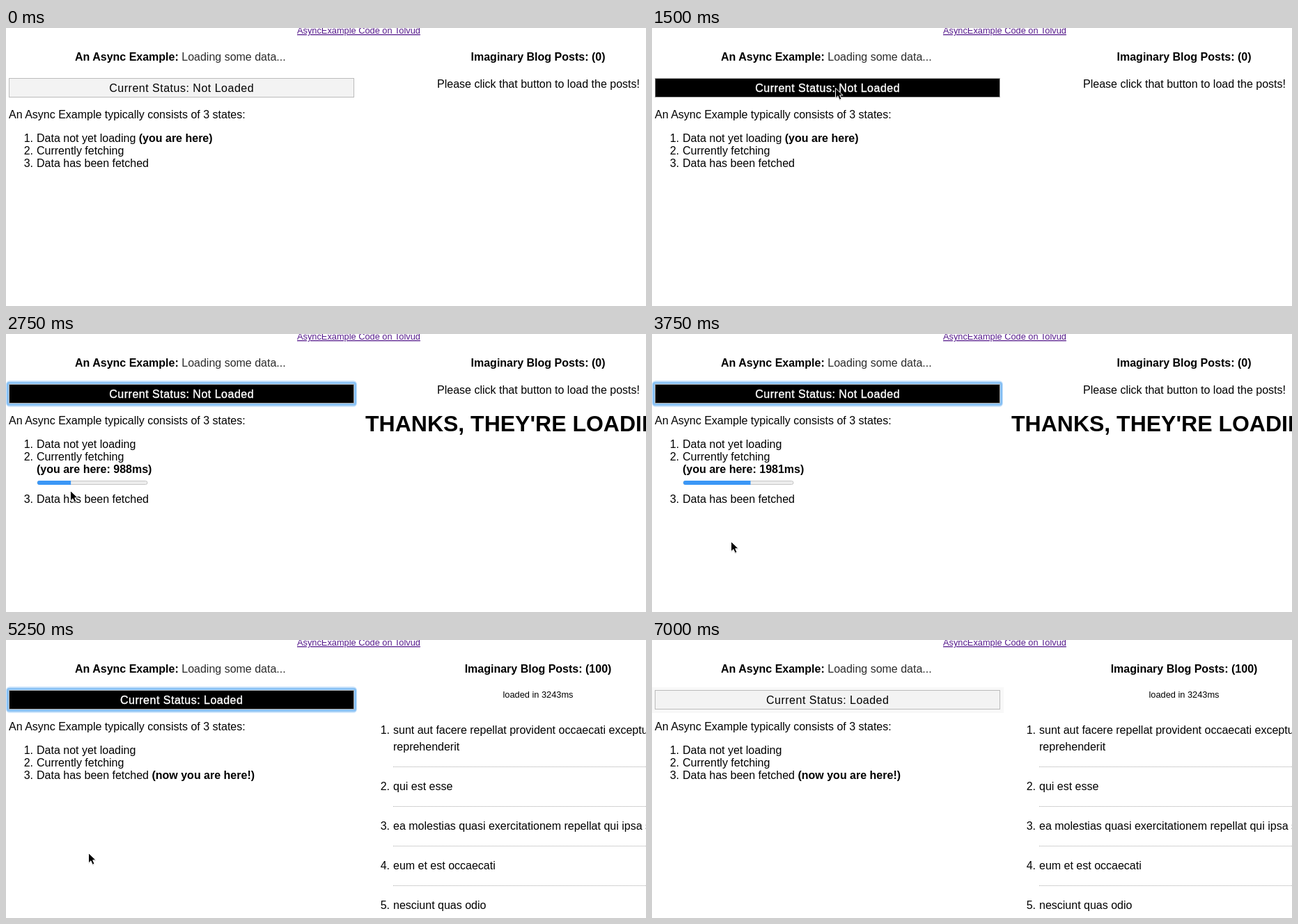
An HTML page that plays this animation: 919x400 px, repeating every 7500 ms.

```html
<!DOCTYPE html>
<html lang="en">
<head>
<meta charset="utf-8">
<title>Async example</title>
<style>
  html, body { margin: 0; width: 100%; height: 100%; overflow: hidden; background: #fff; }
  svg { display: block; width: 919px; height: 400px; font: 16px "Liberation Sans", Arial, sans-serif; }
  text { fill: #000; }
  .b { font-weight: 700; }
  .mid { text-anchor: middle; }
  .end { text-anchor: end; }
  .small { font-size: 12.8px; }
  .link { fill: #551a8b; text-decoration: underline; }
  .light { fill: #2c2c2c; }
  .big { font-size: 32px; font-weight: 700; }
  #label { letter-spacing: .5px; }
  #button { fill: #f3f3f3; stroke: #bbb; }
  .dark #button { fill: #000; stroke: #aaa; }
  .dark #label { fill: #fff; stroke: #fff; stroke-width: .4px; }
  .rule { stroke: #a8a8a8; stroke-dasharray: 1 1; }
</style>
</head>
<body>
<svg viewBox="0 0 919 400">
  <text class="small link" x="418" y="8">AsyncExample Code on Tolvud</text>
  <text x="99" y="47"><tspan class="b">An Async Example:</tspan> <tspan class="light">Loading some data...</tspan></text>
  <text id="title" class="b mid" x="764" y="47"></text>

  <rect id="halo" y="68" width="505" height="37" fill="#f8f8f8"/>
  <g id="ring" fill="none" stroke="#6db3f2">
    <rect x="1.5" y="68.5" width="501" height="35" rx="4" stroke-width="3" opacity=".35"/>
    <rect x="2.5" y="70.5" width="499" height="31" rx="2" stroke-width="3" opacity=".75"/>
  </g>
  <g id="status">
    <rect id="button" x="4.5" y="72.5" width="495" height="27"/>
    <text id="label" class="mid" x="252.2" y="92"></text>
  </g>

  <text x="4" y="130">An Async Example typically consists of 3 states:</text>
  <text class="end" x="39" y="164">1.</text>
  <text x="44" y="164">Data not yet loading <tspan id="here1" class="b">(you are here)</tspan></text>
  <text class="end" x="39" y="182">2.</text>
  <text x="44" y="182">Currently fetching</text>
  <g id="third">
    <text class="end" x="39" y="200">3.</text>
    <text x="44" y="200">Data has been fetched <tspan id="here3" class="b">(now you are here!)</tspan></text>
  </g>

  <text id="please" class="mid" x="764.5" y="86">Please click that button to load the posts!</text>
  <g id="loading">
    <text id="counter" class="b" x="44" y="200"></text>
    <rect x="45" y="211.5" width="158" height="5" rx="2.5" fill="#ededed" stroke="#c6c6c6"/>
    <clipPath id="pill"><rect x="45" y="211" width="158" height="6" rx="3"/></clipPath>
    <rect id="bar" x="45" y="211" height="6" fill="#3b97f6" clip-path="url(#pill)"/>
    <text class="big" x="516" y="140">THANKS, THEY'RE LOADING!</text>
  </g>
  <g id="posts">
    <text class="small mid" x="764" y="83">loaded in 3243ms</text>
  </g>

  <g id="cursor">
    <path d="M.5 .5V15L3.9 11.8 6.3 17.2 9 16 6.7 10.8H11.2Z" fill="#000" opacity=".25" transform="translate(0 1)"/>
    <path d="M.5 .5V15L3.9 11.8 6.3 17.2 9 16 6.7 10.8H11.2Z" stroke="#fff"/>
  </g>
</svg>
<script>
const LOOP = 7500, STEP = 250, TOTAL = 3243;
const CLICK = 1750, FETCH = 2000, DONE = 5250, BLUR = 7000;
const $ = id => document.getElementById(id);
const show = (id, on) => { $(id).style.display = on ? '' : 'none'; };

// [time, value...]
const COUNT = [[2000, 244], [3750, 1981], [5000, TOTAL]];
const PATH = [
  [250, 283, 52], [500, 272, 76], [750, 266, 84], [1250, 264, 86], [1500, 263, 86], [2250, 263, 86],
  [2500, 160, 150], [2750, 92, 225], [3000, 82, 270], [3250, 96, 292], [3750, 113, 298],
  [4000, 115, 301], [4500, 118, 306], [5500, 118, 306],
  [5750, 200, 245], [6000, 320, 160], [6250, 396, 105]
];

function sample(keys, t) {
  const i = keys.findIndex(k => k[0] >= t);
  if (i <= 0) return keys[i < 0 ? keys.length - 1 : 0].slice(1);
  const a = keys[i - 1], b = keys[i], p = (t - a[0]) / (b[0] - a[0]);
  return a.slice(1).map((v, n) => Math.round(v + (b[n + 1] - v) * p));
}

function buildPosts() {
  const posts = [
    [135, 'sunt aut facere repellat provident occaecati excepturi optio'],
    [216, 'qui est esse'],
    [273, 'ea molestias quasi exercitationem repellat qui ipsa sit aut'],
    [330, 'eum et est occaecati'],
    [387, 'nesciunt quas odio']
  ];
  let out = '<text x="556" y="159">reprehenderit</text>';
  posts.forEach(([y, title], i) => {
    out += `<text class="end" x="551" y="${y}">${i + 1}.</text><text x="556" y="${y}">${title}</text>`;
    if (i) out += `<path class="rule" d="M556 ${y - 33.5}H919"/>`;
  });
  $('posts').insertAdjacentHTML('beforeend', out);
}

function render(t) {
  const loaded = t >= DONE, loading = t >= FETCH && !loaded;
  const [x, y] = sample(PATH, t);
  const [ms] = sample(COUNT, t);

  $('title').textContent = `Imaginary Blog Posts: (${loaded ? 100 : 0})`;
  $('label').textContent = `Current Status: ${loaded ? '' : 'Not '}Loaded`;
  $('status').setAttribute('class', t >= 500 && t < BLUR ? 'dark' : '');
  $('counter').textContent = `(you are here: ${ms}ms)`;
  $('bar').setAttribute('width', 158 * ms / TOTAL);
  $('third').setAttribute('transform', `translate(0 ${loading ? 43 : 0})`);
  $('cursor').setAttribute('transform', `translate(${x} ${y})`);

  show('halo', t >= BLUR);
  show('ring', t >= CLICK && t < BLUR);
  show('here1', t < FETCH);
  show('here3', loaded);
  show('loading', loading);
  show('please', !loaded);
  show('posts', loaded);
  show('cursor', t >= 250 && t < 6500);
}

let last = -1;
const start = performance.now();
function tick() {
  const t = Math.floor((performance.now() - start) % LOOP / STEP) * STEP;
  if (t !== last) render(last = t);
  requestAnimationFrame(tick);
}
buildPosts();
tick();
</script>
</body>
</html>
```
